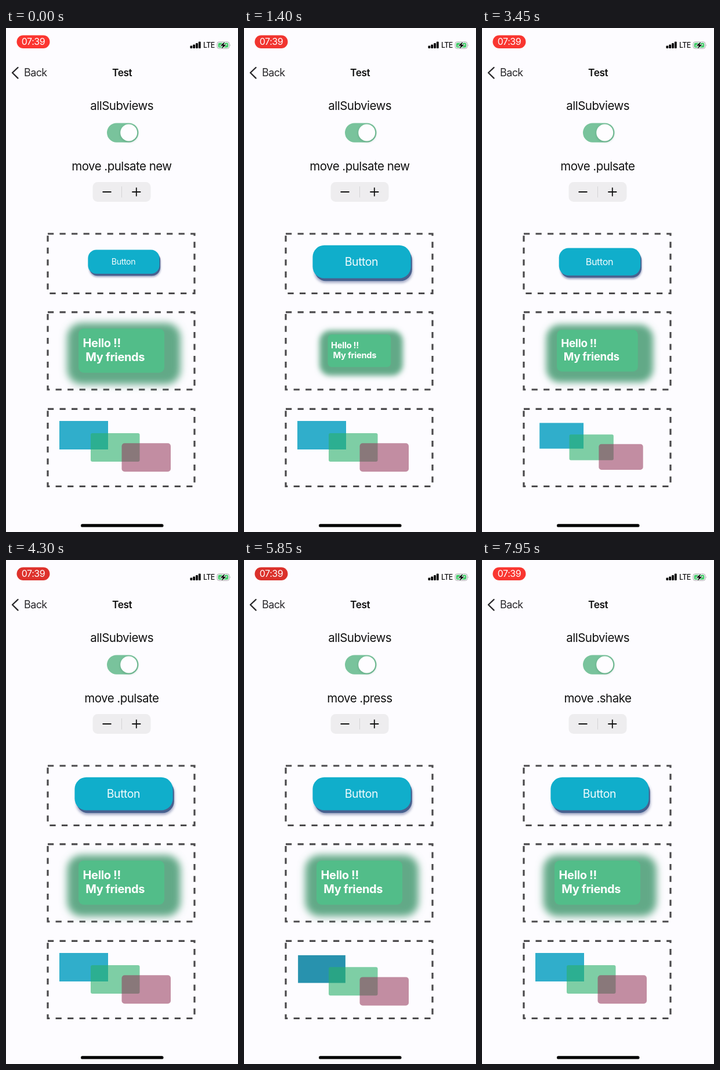
An HTML page for the animation above (8000 ms loop, 400 px wide and 867 px high).

```html
<!DOCTYPE html>
<html lang="en">
<head>
<meta charset="utf-8">
<title>Test</title>
<style>
  html, body { margin: 0; width: 100%; height: 100%; overflow: hidden; background: #fdfcff; }
  svg { display: block; width: 100%; height: 100%; }
  text { font-family: Inter, "Open Sans", sans-serif; fill: #111; }
  .mid { text-anchor: middle; }
  .heading { font-size: 20.5px; letter-spacing: -.53px; }
  .hello { font-size: 20px; font-weight: 700; letter-spacing: -.35px; fill: #fff; }
  .dash { fill: none; stroke: #4b4a4c; stroke-width: 3.2; stroke-dasharray: 10.256; }
</style>
</head>
<body>
<svg viewBox="0 0 400 867" preserveAspectRatio="none">
  <defs>
    <filter id="glow" x="-20%" y="-30%" width="140%" height="160%"><feGaussianBlur stdDeviation="6.3"/></filter>
    <filter id="soft" x="-10%" y="-20%" width="120%" height="140%"><feGaussianBlur stdDeviation="2"/></filter>
    <filter id="edge"><feGaussianBlur stdDeviation=".6"/></filter>
  </defs>
  <rect width="400" height="867" fill="#fdfcff"/>

  <!-- status bar -->
  <rect id="pill" x="18.5" y="12.5" width="57" height="22.5" rx="11.25"/>
  <text class="mid" x="47" y="29.2" font-size="16" letter-spacing="-.4" style="fill:#fff">07:39</text>
  <g>
    <rect x="317.5" y="30.5" width="3.8" height="4.5" rx="1"/>
    <rect x="322.3" y="28.5" width="3.8" height="6.5" rx="1"/>
    <rect x="327.1" y="26" width="3.8" height="9" rx="1"/>
    <rect x="331.9" y="23.5" width="3.8" height="11.5" rx="1"/>
  </g>
  <text x="340" y="34.3" font-size="12.5" font-weight="500" letter-spacing="-.7">LTE</text>
  <rect x="364" y="23.8" width="21" height="11.6" rx="3.6" fill="none" stroke="#a9a8ab"/>
  <rect x="365.7" y="25.5" width="17.6" height="8.2" rx="2.2" fill="#45cb6b"/>
  <path d="M386.4 27.7q1.6 1.9 0 3.8z" fill="#a9a8ab"/>
  <path d="M377.5 23.2L369.5 30.6H374L371.3 36.2L379.6 28.7H375z" stroke="#fdfcff" stroke-width="1.6" paint-order="stroke"/>

  <!-- navigation and controls -->
  <path d="M20.5 68L11 77L20.5 86.3" fill="none" stroke="#29282b" stroke-width="2.4" stroke-linecap="round" stroke-linejoin="round"/>
  <text x="31" y="83.3" font-size="18" letter-spacing="-.6" style="fill:#29282b">Back</text>
  <text class="mid" x="200.2" y="83.2" font-size="17.3" font-weight="600" letter-spacing="-.4">Test</text>
  <text class="mid heading" x="199.7" y="140.8">allSubviews</text>
  <rect x="174" y="163.5" width="54.5" height="33.2" rx="16.6" fill="#79c39c"/>
  <circle cx="212" cy="181.2" r="14.8" fill="#3d7a5a" opacity=".35" filter="url(#soft)"/>
  <circle cx="211.7" cy="180.1" r="14.5" fill="#fefdff"/>
  <text id="move" class="mid heading" x="199.4" y="244.6"></text>
  <rect x="149.5" y="265" width="100" height="34" rx="8.5" fill="#eeedef"/>
  <path d="M199.5 272.5V291.5" stroke="#d3d2d5"/>
  <path d="M166.5 282H181.5M217.3 282H232.3M224.8 274.5V289.5" stroke="#111" stroke-width="1.8"/>

  <path class="dash" d="M72 354H325V456.5H72z"/>
  <path class="dash" d="M72 488.8H325V622H72z"/>
  <path class="dash" d="M72 655.3H325V788.5H72z"/>
  <rect x="129" y="853.3" width="142.5" height="5.2" rx="2.6"/>

  <g id="button">
    <rect x="121" y="381" width="169.5" height="57.5" rx="20" fill="#8790b4" opacity=".75" filter="url(#soft)"/>
    <rect x="121.3" y="378.8" width="168.5" height="56.4" rx="20" fill="#48618f" filter="url(#edge)"/>
    <rect x="118.4" y="373.8" width="169.2" height="56.8" rx="20" fill="#10aecb"/>
    <text class="mid" x="202.4" y="408.8" font-size="19.5" letter-spacing="-.5" style="fill:#f2fbfd">Button</text>
  </g>

  <g id="label">
    <rect x="105.5" y="507.5" width="195.5" height="105.5" rx="25" fill="#62a987" filter="url(#glow)"/>
    <rect x="125" y="517" width="148" height="76" rx="9" fill="#52bd89" filter="url(#edge)"/>
    <text class="hello" x="132.5" y="548.8">Hello !!</text>
    <text class="hello" x="137.3" y="572.8">My friends</text>
  </g>

  <g id="shapes">
    <rect id="blue" x="92" y="676" width="84" height="49"/>
    <rect id="green" x="146" y="697" width="84.5" height="49" rx="3" fill="#2bb16b" opacity=".6" filter="url(#edge)"/>
    <rect id="pink" x="199.5" y="714.2" width="84.5" height="49" rx="5" fill="#923357" opacity=".55" filter="url(#edge)"/>
  </g>
</svg>
<script>
const LOOP = 8000;
const $ = id => document.getElementById(id);
const mix = (a, b, k) => a + (b - a) * k;
const ease = k => (1 - Math.cos(Math.PI * k)) / 2;
const rgb = (from, to, k) => `rgb(${from.map((c, i) => Math.round(mix(c, to[i], k)))})`;

const titles = [[6500, "shake"], [4600, "press"], [1950, "pulsate"], [0, "pulsate new"]];

// dip: depth of the scale; bounce: first low point, repeated until bounceEnd;
// pulse: start and number of cycles; press, shake: start times
const views = {
  button: { x: 202.75, y: 402, dip: .272, over: .04, bounce: 0, bounceEnd: 2160,
            pulse: [2222, 2], press: [5050], shake: [6700] },
  label: { x: 198.5, y: 556, dip: .265, over: .07, bounce: 450, bounceEnd: 1680,
           pulse: [1690, 2], press: [4700, 5400], shake: [7050, 7480] },
  shapes: { x: 197, y: 720.5, dip: .05, over: .02, bounce: 700, bounceEnd: 1910,
            pulse: [2047, 2], press: [5700, 6250], shake: [7350] }
};
const children = { blue: [134, 700.5], green: [188.25, 721.5], pink: [241.75, 738.7] };

function scaleAt(v, t) {
  if (t < v.bounceEnd) {
    const period = 950;
    const d = ((t - v.bounce + 200) % period + period) % period - 200;
    if (d < 0) return 1 - v.dip * ease(d / 200 + 1);
    if (d < 150) return mix(1 - v.dip, 1 + v.over, ease(d / 150));
    return d < 250 ? 1 + v.over * (1 - ease((d - 150) / 100)) : 1;
  }
  const cycles = (t - v.pulse[0]) / 953;
  return cycles > 0 && cycles < v.pulse[1] ? 1 - v.dip * ease(cycles * 2) : 1;
}

function pressAt(v, t) {
  return Math.max(...v.press.map(start => {
    const d = t - start;
    return Math.max(0, Math.min(1, d / 110, (360 - d) / 150));
  }));
}

function shakeAt(v, t) {
  const start = v.shake.find(s => t >= s && t < s + 400);
  return start === undefined ? 0 : -5.5 * Math.cos((t - start) * Math.PI / 100);
}

function place(id, x, y, scale, dx = 0, dy = 0) {
  $(id).setAttribute("transform", `translate(${x + dx} ${y + dy}) scale(${scale}) translate(${-x} ${-y})`);
}

function draw(now) {
  const t = now % LOOP;
  $("move").textContent = "move ." + titles.find(([start]) => t >= start)[1];
  const glow = (1 + Math.cos((t / 1600 - .06) * 2 * Math.PI)) / 2;
  $("pill").setAttribute("fill", rgb([216, 49, 43], [252, 54, 48], glow));

  for (const [id, v] of Object.entries(views)) {
    const press = pressAt(v, t);
    const scale = scaleAt(v, t);
    const squeeze = id === "shapes" ? 1 : 1 - .02 * press;
    place(id, v.x, v.y, scale * squeeze, shakeAt(v, t), 3.2 * press);
    if (id === "shapes") {
      for (const [child, [x, y]] of Object.entries(children))
        place(child, x, y, scale * (child === "blue" ? 1 - .027 * press : 1));
      $("blue").setAttribute("fill", rgb([48, 174, 203], [40, 146, 174], press));
    }
  }
  requestAnimationFrame(() => draw(performance.now() - begin));
}
const begin = performance.now();
draw(0);
</script>
</body>
</html>
```
